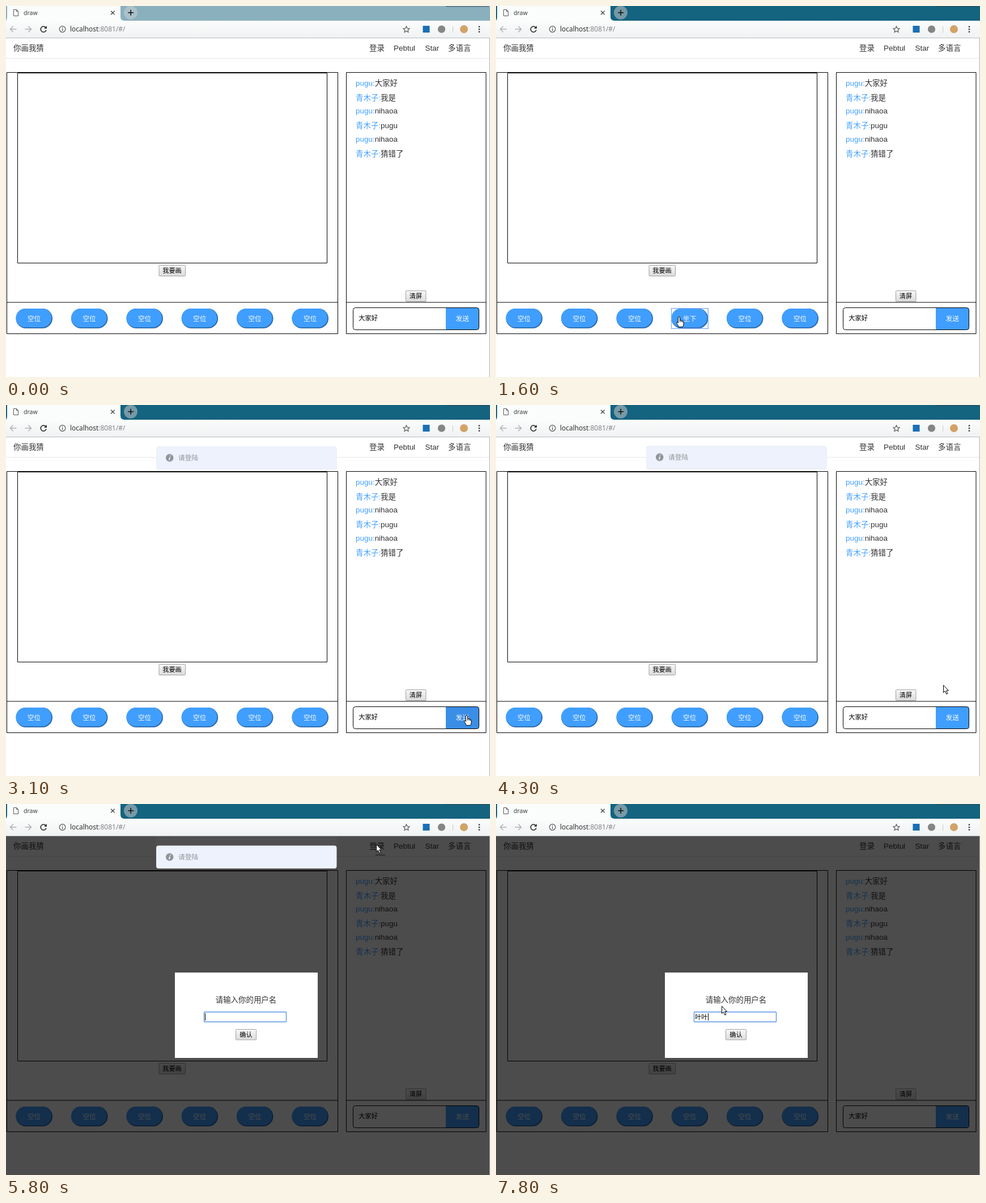
Recreate the animation shown at these times as an HTML page. Size 854x656 px, loop 8000 ms.

```html
<!DOCTYPE html>
<html lang="zh-CN">
<head>
<meta charset="utf-8">
<title>draw</title>
<style>
html, body { margin: 0; width: 100%; height: 100%; overflow: hidden; background: #fff; }
svg { display: block; width: 854px; height: 656px; }
text { font: 13.44px "Liberation Sans", "Noto Sans CJK SC", "Noto Sans CJK JP", sans-serif; fill: #303133; white-space: pre; }
.mid { text-anchor: middle; }
.ui { font-family: "Open Sans", "Noto Sans", sans-serif; }
.btn { font-size: 11.2px; fill: #000; text-anchor: middle; }
.lab { font-size: 11.6px; fill: #fff; text-anchor: middle; }
.name { fill: #409eff; }
.line { fill: none; stroke: #000; }

/* hard changes */
.step { animation: 8s step-end infinite; }
#active { animation-name: active; }
#cursor { animation-name: path; }
#arrow { animation-name: arrow; }
#hand { animation-name: hand; }
#seat4 { animation-name: seat4; }
#seat5 { animation-name: seat5; }
#seat6 { animation-name: seat6; }
#ring { animation-name: ring; }
#send { animation-name: send; }
#under { animation-name: under; transform-origin: 669px 90px; }
#login { animation-name: login; }
#caret { animation-name: caret; }
#ime { animation-name: ime; }
#py1 { animation-name: py1; }
#py2 { animation-name: py2; }
#py3 { animation-name: py3; }
#typed { animation-name: typed; }

@keyframes active { 0% { opacity: 0 } 6.25%, 100% { opacity: 1 } }
@keyframes path {
  0% { transform: translate(-60px, -60px) }
  2.5% { transform: translate(686px, 190px) }
  3.75% { transform: translate(403px, 289px) }
  6.25% { transform: translate(389px, 304px) }
  7.5% { transform: translate(389px, 312px) }
  8.75% { transform: translate(378px, 342px) }
  10% { transform: translate(382px, 356px) }
  11.25% { transform: translate(366px, 382px) }
  13.75% { transform: translate(350px, 462px) }
  15% { transform: translate(344px, 505px) }
  16.25% { transform: translate(342px, 537px) }
  17.5% { transform: translate(323px, 549px) }
  26.25% { transform: translate(384px, 551px) }
  27.5% { transform: translate(440px, 549px) }
  28.75% { transform: translate(540px, 550px) }
  30% { transform: translate(614px, 552px) }
  31.25% { transform: translate(616px, 558px) }
  32.5% { transform: translate(720px, 553px) }
  33.75% { transform: translate(813px, 548px) }
  53.75% { transform: translate(789px, 495px) }
  55% { transform: translate(700px, 255px) }
  56.25% { transform: translate(660px, 83px) }
  58.75% { transform: translate(653px, 71px) }
  76.25% { transform: translate(585px, 175px) }
  77.5% { transform: translate(471px, 298px) }
  78.75% { transform: translate(418px, 337px) }
  80% { transform: translate(404px, 351px) }
  81.25%, 100% { transform: translate(398px, 357px) }
}
@keyframes arrow { 0%, 26.25%, 30%, 53.75%, 100% { opacity: 1 } 16.25%, 27.5%, 33.75% { opacity: 0 } }
@keyframes hand { 0%, 26.25%, 30%, 53.75%, 100% { opacity: 0 } 16.25%, 27.5%, 33.75% { opacity: 1 } }
@keyframes seat4 { 0%, 26.25%, 100% { opacity: 0 } 16.25% { opacity: 1 } }
@keyframes seat5 { 0%, 28.75%, 100% { opacity: 0 } 27.5% { opacity: 1 } }
@keyframes seat6 { 0%, 30%, 100% { opacity: 0 } 28.75% { opacity: 1 } }
@keyframes ring { 0%, 35%, 100% { opacity: 0 } 20% { opacity: 1 } }
@keyframes send { 0%, 53.75%, 100% { fill: #409eff } 33.75% { fill: #3a8ee6 } }
@keyframes under {
  0% { opacity: 0; transform: none }
  58.75% { opacity: 1; transform: none }
  72.5% { opacity: 1; transform: scaleX(.58) }
  73.75%, 100% { opacity: 0; transform: none }
}
@keyframes login { 0% { opacity: 0 } 72.5%, 100% { opacity: 1 } }
@keyframes caret {
  0%, 83.75% { opacity: 1; transform: none }
  77.5% { opacity: 0; transform: none }
  97.5%, 100% { opacity: 1; transform: translateX(23px) }
}
@keyframes ime { 0%, 97.5%, 100% { opacity: 0 } 88.75% { opacity: 1 } }
@keyframes py1 { 0%, 100% { opacity: 1 } 90% { opacity: 0 } }
@keyframes py2 { 0%, 91.25%, 100% { opacity: 0 } 90% { opacity: 1 } }
@keyframes py3 { 0% { opacity: 0 } 91.25%, 100% { opacity: 1 } }
@keyframes typed { 0% { opacity: 0 } 97.5%, 100% { opacity: 1 } }

/* sliding notices */
.note { animation: 8s ease infinite; }
#note1 { animation-name: note1; }
#note2 { animation-name: note2; }
#note3 { animation-name: note3; }
@keyframes note1 {
  0%, 20.6%, 63.1%, 100% { opacity: 0; transform: translateY(-40px) }
  25.6%, 58.1% { opacity: 1; transform: none }
}
@keyframes note2 {
  0%, 34.4%, 73.5%, 100% { opacity: 0; transform: translateY(-40px) }
  39.4%, 68.5% { opacity: 1; transform: none }
}
@keyframes note3 {
  0%, 50%, 78.2%, 100% { opacity: 0; transform: translateY(-40px) }
  55%, 73.2% { opacity: 1; transform: none }
}
</style>
</head>
<body>
<svg viewBox="0 0 854 656">
  <defs>
    <linearGradient id="bar" x2="0" y2="1"><stop stop-color="#fbfcfc"/><stop offset="1" stop-color="#f0f2f3"/></linearGradient>
    <linearGradient id="grey" x2="0" y2="1"><stop stop-color="#f7f7f7"/><stop offset="1" stop-color="#dcdcdc"/></linearGradient>
    <clipPath id="page"><path d="M0 57H853V656H0z"/></clipPath>
    <g id="pill">
      <rect width="64.5" height="35" rx="17.5" fill="#2a69ad"/>
      <rect width="62.8" height="33.2" rx="16.6" fill="#409eff"/>
    </g>
    <g id="seat"><use href="#pill"/><text class="lab" x="32" y="21.5">空位</text></g>
    <g id="sit"><use href="#pill"/><text class="lab" x="32" y="21.5">坐下</text></g>
    <g id="note">
      <rect x="265.5" y="74" width="317.5" height="39.5" rx="3" fill="#edf2fc" stroke="#ebeef5"/>
      <circle cx="288.7" cy="93.8" r="6.8" fill="#909399"/>
      <path d="M289.9 89.6l-.3 1.5M289 92.8l-1 5" stroke="#fff" stroke-width="1.8"/>
      <text x="304" y="98" style="font-size:11.76px;fill:#909399">请登陆</text>
    </g>
  </defs>

  <!-- browser window -->
  <rect width="854" height="27" fill="#8ab0be"/>
  <circle cx="220" cy="11.7" r="12" fill="#abc1c9"/>
  <g id="active" class="step">
    <rect width="854" height="27" fill="#14637f"/>
    <circle cx="220" cy="11.7" r="12" fill="#7599a6"/>
  </g>
  <path d="M775 0H852V1.5H777z" fill="#314d58" opacity=".65"/>
  <path d="M0 26Q2 24 2 18V0H202V19Q202 26 209 26V27H0z" fill="#fbfcfc"/>
  <path d="M215.2 11.7h10M220.2 6.7v10" stroke="#111" stroke-width="1.6"/>
  <path d="M13.5 6.5h5l3 3v8h-8zM18.5 6.5v3h3" fill="#fff" stroke="#555"/>
  <text class="ui" x="31" y="16" style="font-size:10.6px">draw</text>
  <path d="M185 8.7l6.6 6.6M191.6 8.7L185 15.3" stroke="#444" stroke-width="1.3"/>
  <rect y="26" width="854" height="30" fill="url(#bar)"/>
  <rect y="56" width="854" height="1" fill="#b9bcbe"/>
  <g fill="none" stroke="#aeb0b2" stroke-width="1.5">
    <path d="M18.5 41H7.5M12.7 35.8L7.5 41l5.2 5.2"/>
    <path d="M33.5 41h11M39.3 35.8l5.2 5.2-5.2 5.2"/>
    <path d="M70.3 38.2A5 5 0 1 0 71 42.6" stroke="#333" stroke-width="1.7"/>
    <circle cx="99.6" cy="41" r="5.3" stroke="#555" stroke-width="1.2"/>
    <path d="M99.6 40.3v3.6M99.6 37.8v1.4" stroke="#555" stroke-width="1.3"/>
    <path d="M706.5 35.9l1.6 3.6 3.9.4-2.9 2.6.8 3.9-3.4-2-3.4 2 .8-3.9-2.9-2.6 3.9-.4z" stroke="#555" stroke-width="1.2"/>
  </g>
  <path d="M72 35v5h-5z" fill="#333"/>
  <text class="ui" x="113" y="45" style="font-size:12px;fill:#222">localhost<tspan fill="#7a7d80">:8081/#/</tspan></text>
  <rect x="735.5" y="35" width="12" height="12" fill="#1b6fb5"/>
  <circle cx="768.5" cy="41" r="6.6" fill="#858585"/>
  <path d="M788.5 36v11" stroke="#c8cacc"/>
  <circle cx="808" cy="41" r="7" fill="#d3a266"/>
  <g fill="#444"><circle cx="835" cy="36.7" r="1.4"/><circle cx="835" cy="41.2" r="1.4"/><circle cx="835" cy="45.7" r="1.4"/></g>

  <!-- page -->
  <g>
    <rect y="57" width="854" height="599" fill="#fff"/>
    <path d="M0 92.5H853" stroke="#e6e6e6"/>
    <text x="13" y="79">你画我猜</text>
    <text x="641" y="79">登录</text>
    <text x="684" y="79">Pebtul</text>
    <text x="739.5" y="79">Star</text>
    <text x="780" y="79">多语言</text>
    <rect id="under" class="step" x="639.5" y="89.5" width="29.5" height="1.5" fill="#808080"/>

    <path class="line" d="M1.5 117.5H585.5V579.5H1.5zM1.5 524H585.5M20.5 118.5H566.5V454.5H20.5z"/>
    <path class="line" d="M600.5 117.5H847V579.5H600.5zM600.5 524H847"/>

    <g fill="url(#grey)" stroke="#a3a3a3">
      <rect x="270" y="458.5" width="46.5" height="19" rx="1"/>
      <rect x="705.5" y="503.5" width="35.5" height="19" rx="1"/>
    </g>
    <text class="btn" x="293" y="472.3">我要画</text>
    <text class="btn" x="723" y="517.3">清屏</text>

    <use href="#seat" x="17.5" y="535"/>
    <use href="#seat" x="115" y="535"/>
    <use href="#seat" x="212.5" y="535"/>
    <use href="#seat" x="309.7" y="535"/>
    <use href="#seat" x="407" y="535"/>
    <use href="#seat" x="504.5" y="535"/>
    <g id="seat4" class="step"><use href="#sit" x="309.7" y="535"/></g>
    <g id="seat5" class="step"><use href="#sit" x="407" y="535"/></g>
    <g id="seat6" class="step"><use href="#sit" x="504.5" y="535"/></g>
    <rect id="ring" class="step" x="309.5" y="534.7" width="64.8" height="35.6" fill="none" stroke="#86aef0" stroke-width="1.4"/>

    <text x="617" y="141"><tspan class="name">pugu:</tspan>大家好</text>
    <text x="617" y="167"><tspan class="name">青木子:</tspan>我是</text>
    <text x="617" y="190"><tspan class="name">pugu:</tspan>nihaoa</text>
    <text x="617" y="216"><tspan class="name">青木子:</tspan>pugu</text>
    <text x="617" y="240"><tspan class="name">pugu:</tspan>nihaoa</text>
    <text x="617" y="266"><tspan class="name">青木子:</tspan>猜错了</text>

    <rect x="612.5" y="533.5" width="222" height="39" rx="4" fill="#fff"/>
    <path id="send" class="step" d="M776 533.5H830.5a4 4 0 0 1 4 4V568.5a4 4 0 0 1-4 4H776z" fill="#409eff"/>
    <rect class="line" x="612.5" y="533.5" width="222" height="39" rx="4"/>
    <text x="622.3" y="556.3" style="font-size:11.2px;fill:#000">大家好</text>
    <text class="lab" x="805.3" y="557" style="font-size:11.9px">发送</text>
  </g>

  <!-- login dialog -->
  <g id="login" class="step">
    <rect y="57" width="853" height="599" opacity=".7"/>
    <rect x="298" y="298" width="252" height="151" fill="#fff"/>
    <text class="mid" x="423.5" y="351.3">请输入你的用户名</text>
    <rect x="349.5" y="367.7" width="145" height="17.6" rx="1" fill="#fff" stroke="#5b95e6" stroke-width="1.4"/>
    <text id="typed" class="step" x="351" y="381" style="font-size:11.2px;fill:#000">叶叶</text>
    <rect id="caret" class="step" x="351" y="370" width="1" height="13"/>
    <rect x="405.5" y="398.5" width="36" height="18.5" rx="1" fill="url(#grey)" stroke="#a3a3a3"/>
    <text class="btn" x="423.5" y="412">确认</text>
    <g id="ime" class="step">
      <rect x="351.5" y="388.5" width="302" height="54" fill="#fff" stroke="#c4cad0"/>
      <path d="M352 413.5H653" stroke="#e4e7ea"/>
      <g id="py1" class="step">
        <text x="360" y="406">y</text>
        <text x="360" y="433"><tspan class="name">1.一</tspan>  2.有  3.也  4.要  5.与</text>
      </g>
      <g id="py2" class="step">
        <text x="360" y="406">ye</text>
        <text x="360" y="433"><tspan class="name">1.也</tspan>  2.叶  3.业  4.夜  5.页</text>
      </g>
      <g id="py3" class="step">
        <text x="360" y="406">ye'ye</text>
        <text x="360" y="433"><tspan class="name">1.叶叶</tspan>  2.夜夜  3.也  4.叶  5.业</text>
      </g>
    </g>
  </g>

  <g clip-path="url(#page)">
    <g id="note1" class="note"><use href="#note"/></g>
    <g id="note2" class="note"><use href="#note"/></g>
    <g id="note3" class="note"><use href="#note"/></g>
  </g>
  <path d="M853.5 57V656" stroke="#a9adb0"/>

  <g id="cursor" class="step" fill="#fff" stroke="#000" stroke-linejoin="round">
    <path id="arrow" class="step" d="M.5.5V13.4L3.4 10.7 5.8 16.2 8 15.2 5.7 9.9H9.5z"/>
    <g id="hand" class="step">
      <path d="M-1.6 11V2Q-1.4.6 0 .6T1.5 2V6.6Q3.4 5.8 4 7.3 5.8 6.6 6.2 8.2 8 8 8 10V13.5Q7.8 16 6.6 18.4H-.8Q-1.4 16-3.6 13.2-4.6 11.6-4.2 10.4-3-.2-1.6 11z" style="display:none"/>
      <path d="M-1.6 11.4V2Q-1.4.6 0 .6T1.5 2V6.6Q3.4 5.8 4 7.3 5.8 6.6 6.2 8.2 8 8 8 10V13.5Q7.8 16 6.6 18.4H-.8Q-1.4 16-3.4 13.4-4.6 11.4-4 10.1-2.8 9.2-1.6 11.4z"/>
      <path d="M1.5 6.6V9.6M4 7.3V9.8M6.2 8.2V10.2" fill="none"/>
    </g>
  </g>
</svg>
</body>
</html>
```
